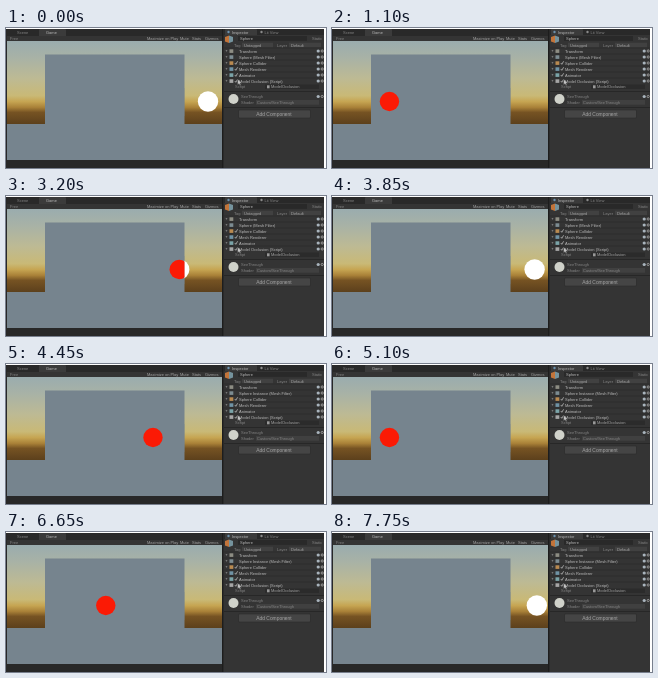
An HTML page that plays this animation: 320 px wide and 140 px high, repeating every 7800 ms.

```html
<!DOCTYPE html>
<html lang="en">
<head>
<meta charset="utf-8">
<title>Occlusion demo</title>
<style>
  html, body { margin: 0; width: 100%; height: 100%; overflow: hidden; background: #242424; }
  svg { display: block; width: 320px; height: 140px; }
  text { font: 4px "Liberation Sans", Arial, sans-serif; fill: #a6a6a6; }
  .bold { fill: #bcbcbc; }
  .dim { fill: #858585; }
  .button { font-size: 4.9px; text-anchor: middle; }
</style>
</head>
<body>
<svg viewBox="0 0 320 140">
  <defs>
    <linearGradient id="sky" x2="0" y2="1">
      <stop offset="0" stop-color="#9aacae"/>
      <stop offset=".2" stop-color="#a8b2a6"/>
      <stop offset=".45" stop-color="#bdba94"/>
      <stop offset=".66" stop-color="#c9b976"/>
      <stop offset=".73" stop-color="#c6a552"/>
      <stop offset=".8" stop-color="#a98138"/>
      <stop offset=".86" stop-color="#765323"/>
      <stop offset="1" stop-color="#5c401c"/>
    </linearGradient>
    <clipPath id="view"><rect y="13" width="216" height="119"/></clipPath>
    <clipPath id="wall"><rect x="39" y="26.5" width="139.5" height="105.5"/></clipPath>
    <g id="rowIcons">
      <circle cx="312.2" r="1.6" fill="#a9b4bd"/>
      <circle cx="316.2" r="1.1" fill="none" stroke="#a0a0a0" stroke-width=".9"/>
    </g>
  </defs>

  <!-- game view -->
  <rect width="216" height="8" fill="#292929"/>
  <path d="M33 8V2q0-1 1-1h25q1 0 1 1v6z" fill="#3b3b3b"/>
  <rect y="8" width="216" height="5" fill="#343434"/>
  <text x="11" y="6" class="dim">Scene</text>
  <text x="40" y="6" class="bold">Game</text>
  <text x="4" y="12" class="dim">Free</text>
  <text x="141" y="12">Maximize on Play</text>
  <text x="174" y="12">Mute</text>
  <text x="186" y="12">Stats</text>
  <text x="199" y="12">Gizmos</text>
  <rect y="13" width="216" height="83" fill="url(#sky)"/>
  <rect y="96" width="216" height="36" fill="#76848e"/>
  <rect x="39" y="26.5" width="139.5" height="105.5" fill="#76848e"/>
  <g id="sphere">
    <g clip-path="url(#view)"><circle class="ball" cy="73.5" r="10.2" fill="#fff"/></g>
    <g clip-path="url(#wall)">
      <rect x="39" y="60" width="139.5" height="28" fill="#76848e"/>
      <circle class="ball" cy="73.5" r="9.7" fill="#fb1a05"/>
    </g>
  </g>
  <rect y="132" width="216" height="8" fill="#282828"/>
  <rect width="1" height="140" fill="#282828"/>
  <rect x="216" width="1.5" height="140" fill="#1d1d1d"/>

  <!-- inspector -->
  <rect x="217.5" width="102.5" height="140" fill="#343434"/>
  <rect x="217.5" width="102.5" height="7" fill="#292929"/>
  <path d="M219 7V2q0-1 1-1h30q1 0 1 1v5z" fill="#3b3b3b"/>
  <circle cx="222.5" cy="4" r="1.2" fill="#6c91ad"/>
  <text x="226" y="5.5" class="bold">Inspector</text>
  <circle cx="255.5" cy="4" r="1.2" fill="#8a8a8a"/>
  <text x="258.5" y="5.5" class="dim">Lit View</text>
  <path d="M219 9l4-1.5v7.5l-4-1.5z" fill="#c2743a"/>
  <path d="M223 7.5l4 1.5v4.5l-4 1.5z" fill="#75939d"/>
  <rect x="232" y="8" width="69" height="4.8" fill="#292929"/>
  <text x="234" y="11.8" class="bold">Sphere</text>
  <text x="306" y="11.8" class="dim">Static</text>
  <text x="228" y="18.5" class="dim">Tag</text>
  <rect x="236" y="14.8" width="31" height="4.5" fill="#414141"/>
  <text x="238" y="18.5">Untagged</text>
  <text x="271" y="18.5" class="dim">Layer</text>
  <rect x="283" y="14.8" width="32" height="4.5" fill="#414141"/>
  <text x="285" y="18.5">Default</text>
  <g id="rows"></g>
  <text x="229" y="60" class="dim">Script</text>
  <rect x="259" y="56.5" width="54" height="4.5" fill="#2b2b2b"/>
  <rect x="261" y="57.3" width="2.6" height="3" fill="#999"/>
  <text x="265" y="60">ModelOcclusion</text>
  <path d="M218 63.5H318M218 79.5H318" stroke="#222" stroke-width=".7"/>
  <circle cx="227.5" cy="71" r="5" fill="#d0d2ca"/>
  <text x="235" y="69.7" class="dim">SeeThrough</text>
  <use href="#rowIcons" y="68.5"/>
  <text x="235" y="75.7" class="dim">Shader</text>
  <rect x="250" y="72" width="63" height="4.7" fill="#404040"/>
  <text x="251" y="75.7" class="dim">Custom/SeeThrough</text>
  <rect x="232.5" y="82" width="72" height="8" rx="1" fill="#454545" stroke="#292929" stroke-width=".6"/>
  <text x="268" y="87.8" class="button">Add Component</text>
  <path d="M231.5 51v6l1.5-1.3 1 2 1-.5-.9-2h2z" fill="#c4c4c4" stroke="#222" stroke-width=".4"/>

  <!-- light border -->
  <path d="M0 0H320V140H318V1H0z" fill="#fff"/>
</svg>
<script>
  const LOOP = 7800, STEP = 50, LEG = 2000;
  const LEFT = 14, RIGHT = 205, LEFT_STOP = 1718;
  const INSTANCED = 4150;      // from here on the sphere is never culled
  const SKIP_AT = 1000, SKIP = 430; // time jump while the sphere is hidden

  const rows = [
    ["Transform", "#8d8d83", false],
    ["Sphere (Mesh Filter)", "#7c8c92", false],
    ["Sphere Collider", "#b98a50", true],
    ["Mesh Renderer", "#6f93a5", true],
    ["Animator", "#7aa4a8", true],
    ["Model Occlusion (Script)", "#a6a6a6", true]
  ];
  document.getElementById("rows").innerHTML = rows.map(([label, color, checked], i) => {
    const y = 23 + i * 6;
    return `<path d="M218 ${y - 3}H318" stroke="#252525" stroke-width=".6"/>
      <path d="M219.5 ${y - 1}h2l-1 2z" fill="#777"/>
      <rect x="223.5" y="${y - 1.7}" width="3.8" height="3.6" fill="${color}"/>
      ${checked ? `<path d="M228.8 ${y}l1 1.3 1.8-3" fill="none" stroke="#ccc" stroke-width=".7"/>` : ""}
      <text class="bold" x="233" y="${y + 1.5}">${label}</text>
      <use href="#rowIcons" y="${y}"/>`;
  }).join("");

  const sphere = document.getElementById("sphere");
  const balls = document.querySelectorAll(".ball");
  const meshLabel = document.querySelectorAll("#rows text")[1];

  function sphereX(t) {
    const time = t < SKIP_AT ? t - SKIP : t;
    const phase = ((time - LEFT_STOP + 4 * LEG) % (2 * LEG)) / LEG;
    const u = phase < 1 ? phase : 2 - phase;
    return LEFT + (RIGHT - LEFT) * u * u * (3 - 2 * u);
  }

  function draw(t) {
    const x = sphereX(t);
    const culled = t < INSTANCED && x > 61 && x < 157;
    balls.forEach(ball => ball.setAttribute("cx", x));
    sphere.setAttribute("visibility", culled ? "hidden" : "visible");
    meshLabel.textContent = t < INSTANCED ? "Sphere (Mesh Filter)" : "Sphere Instance (Mesh Filter)";
  }

  let start;
  function tick(now) {
    start ??= now;
    draw(Math.floor((now - start) % LOOP / STEP) * STEP);
    requestAnimationFrame(tick);
  }
  draw(0);
  requestAnimationFrame(tick);
</script>
</body>
</html>
```
